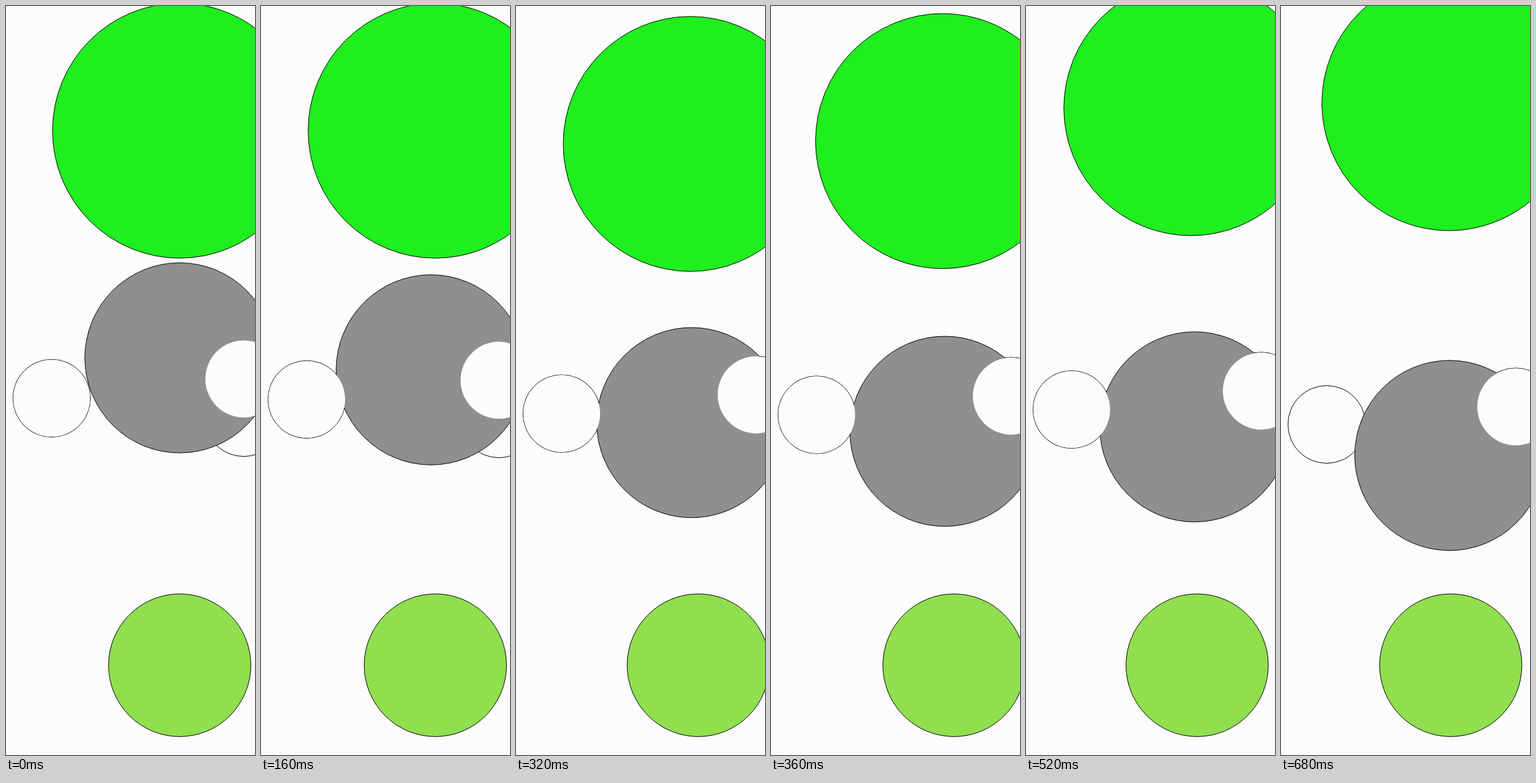
These frames come from a looping animation (400x1200 px, 720 ms). An HTML page with a canvas:

```html
<!DOCTYPE html>
<html lang="en">
<head>
<meta charset="utf-8">
<title>Drifting circles</title>
<style>
  html, body { margin: 0; width: 100%; height: 100%; overflow: hidden; background: #fcfcfc; }
  canvas { display: block; }
</style>
</head>
<body>
<canvas id="stage" width="400" height="1200"></canvas>
<script>
const ctx = document.getElementById('stage').getContext('2d');
const STEP = 40, STEPS = 18;
const PAPER = '#fcfcfc';

const ease = u => u * u * (3 - 2 * u);

// Eases from one [step, value] turning point to the next, resting before and after
function path(...points) {
  return step => points.slice(1).reduce((value, [end, target], i) => {
    const [start, from] = points[i];
    const u = Math.min(Math.max((step - start) / (end - start), 0), 1);
    return value + (target - from) * ease(u);
  }, points[0][1]);
}

// The smaller circles swing to one common beat: rest, out, back, end
const swing = (rest, out, back, end) => path([3, rest], [9, out], [14, back], [18, end]);

const bigX = path([2, 279], [7, 282], [12, 264.5], [17, 270]);
const bigY = path([4, 199.7], [8, 221], [14, 159], [18, 155]);
const middleX = path([0, 279], [6, 271], [8, 282], [11, 270.8]);
const middleY = path([2, 563.7], [10, 686.7], [14, 672], [18, 729]);
const lowX = swing(279, 294, 272.7, 272.7);
const leftY = swing(628.4, 655, 645.5, 675);
const rightX = swing(382, 386, 377, 377);
const rightY = swing(597.5, 625, 616, 647);

function circle(x, y, radius, fill, outlined = true) {
  ctx.beginPath();
  ctx.arc(x, y, radius, 0, Math.PI * 2);
  ctx.fillStyle = fill;
  ctx.fill();
  if (outlined) ctx.stroke();
}

function draw(step) {
  ctx.fillStyle = PAPER;
  ctx.fillRect(0, 0, 400, 1200);
  ctx.strokeStyle = '#000';

  const left = [73.4, leftY(step)];
  const right = [rightX(step), rightY(step)];
  circle(bigX(step), bigY(step), 204.3, '#1fee1f');
  circle(lowX(step), 1056.2, 114.3, '#8fdf4f');
  circle(right[0], right[1] + 62, 62.2, PAPER);
  circle(...right, 62.2, PAPER);
  circle(...left, 62.2, PAPER);
  circle(middleX(step), middleY(step), 152.3, '#8f8f8f');

  // Plain discs cut into the middle circle
  circle(...right, 61.7, PAPER, false);
  if (step < 15) circle(...left, 61.7, PAPER, false);
}

function frame() {
  draw(Math.floor(performance.now() / STEP) % STEPS);
  requestAnimationFrame(frame);
}
frame();
</script>
</body>
</html>
```
